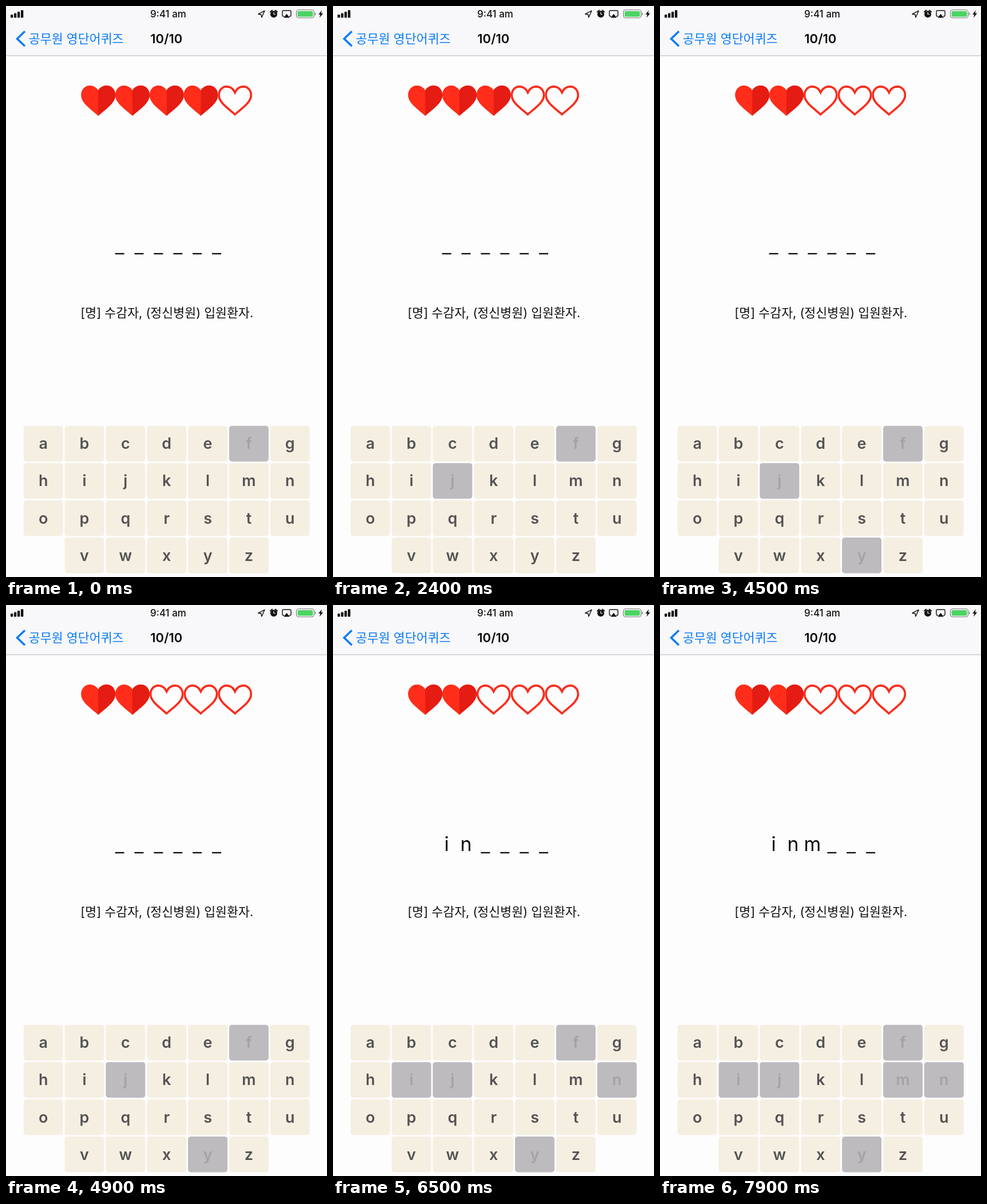
These frames come from a looping animation (561x998 px, 8 s). An HTML page:

```html
<!DOCTYPE html>
<html lang="ko">
<head>
<meta charset="utf-8">
<style>
  html, body { margin: 0; width: 100%; height: 100%; overflow: hidden; background: #fefdfe; }
  svg { display: block; width: 100%; height: 100%; }
  text { font-family: Inter, "Noto Sans CJK KR", "Noto Sans CJK", sans-serif; text-anchor: middle; }
  .outline { fill: none; stroke: #fb2c1c; stroke-width: 7.4; clip-path: url(#heartClip); }
  .key rect { fill: #f5efe2; }
  .key text { fill: #545353; font-size: 27px; font-weight: 600; }
  .used rect { fill: #bebbbf; }
  .used text { fill: #a4a2a6; }
</style>
</head>
<body>
<svg viewBox="0 0 561 998">
  <defs>
    <path id="heart" d="M0 8.5C-3 3-9 0-14.5 0C-23-.2-30 7-30 16.5C-30 31-13 41 0 53C13 41 30 31 30 16.5C30 7 23-.2 14.5 0C9 0 3 3 0 8.5Z"/>
    <clipPath id="heartClip"><use href="#heart"/></clipPath>
    <clipPath id="rightHalf"><rect width="31" height="54"/></clipPath>
  </defs>

  <rect width="561" height="87" fill="#f8f7f9"/>
  <rect y="86.3" width="561" height="1.2" fill="#c3c2c5"/>

  <g id="signal"></g>
  <text x="283.5" y="20" font-size="17" font-weight="500" fill="#111">9:41 am</text>
  <path d="M440.8 14.2L452 8.4L446.8 20L445.9 14.8Z" fill="none" stroke="#111" stroke-width="1.4" stroke-linejoin="round"/>
  <circle cx="468" cy="14.3" r="6" fill="#111"/>
  <path d="M462 10.3L465.2 7.6M474 10.3L470.8 7.6" stroke="#111" stroke-width="2" stroke-linecap="round"/>
  <path d="M468 10.8V14.5H471" fill="none" stroke="#f8f7f9" stroke-width="1.2"/>
  <path d="M486 18H484.5Q483 18 483 16.5V9.5Q483 8 484.5 8H496.5Q498 8 498 9.5V16.5Q498 18 496.5 18H495" fill="none" stroke="#111" stroke-width="1.4"/>
  <path d="M490.5 13.8L496 20.4H485Z" fill="#111"/>
  <rect x="507.5" y="6.8" width="31" height="14" rx="4" fill="none" stroke="#777" stroke-width="1.1"/>
  <rect x="509.6" y="8.9" width="26.8" height="9.8" rx="2.2" fill="#4cd463"/>
  <path d="M540 11.2Q543.2 13.8 540 16.4Z" fill="#777"/>
  <path d="M552 7.4L546 14.8H549.3L548 20.6L554.2 12.8H550.7Z" fill="#111"/>

  <path d="M33 44.3L19.5 57.3L33 70.3" fill="none" stroke="#0a7cf6" stroke-width="3.6"/>
  <text x="122.7" y="65" font-size="21.7" fill="#0a7cf6">공무원 영단어퀴즈</text>
  <text x="280.3" y="65.2" font-size="22" font-weight="600" fill="#0a0a0a">10/10</text>

  <g id="hearts"></g>
  <g id="word" font-size="34" fill="#0a0a0a"></g>
  <text x="281.3" y="544.3" font-size="21.7" fill="#111">[명] 수감자, (정신병원) 입원환자.</text>
  <g id="keys"></g>
</svg>

<script>
const LOOP = 8000;
const WORD = "inmate";
const LIVES = 5;
const presses = [["f", 0], ["j", 2000], ["y", 3600], ["i", 5100], ["n", 6000], ["m", 7200]];

const range = n => [...Array(n).keys()];
const build = (id, items, draw) => {
  const group = document.getElementById(id);
  group.innerHTML = items.map(draw).join("");
  return [...group.children];
};
const show = (node, visible) => { node.style.display = visible ? "" : "none"; };

build("signal", [5.5, 8, 10.5, 13.2], (h, i) =>
  `<rect x="${8 + i * 6}" y="${20.4 - h}" width="4.3" height="${h}" rx="1" fill="#111"/>`);

const hearts = build("hearts", range(LIVES), i =>
  `<g transform="translate(${161.2 + i * 59.75} 139)">
    <g><use href="#heart" fill="#ff2d1a"/><use href="#heart" fill="#e41c13" clip-path="url(#rightHalf)"/></g>
    <use href="#heart" class="outline"/>
  </g>`);

const slots = build("word", [...WORD], (letter, i) => {
  const x = 198.6 + i * 33.9;
  return `<g><rect x="${x - 8}" y="431.8" width="16" height="2.3"/><text x="${x}" y="430">${letter}</text></g>`;
});

const alphabet = [..."abcdefghijklmnopqrstuvwxyz"];
const keys = build("keys", alphabet, (letter, i) => {
  const row = Math.floor(i / 7);
  const column = i % 7 + (row === 3 ? 1 : 0);
  return `<g transform="translate(${30.7 + column * 71.85} ${733.8 + row * 65.1})">
    <rect width="69" height="62.4" rx="5"/><text x="34.5" y="40.6">${letter}</text>
  </g>`;
});

function render(time) {
  const used = presses.filter(([, at]) => at <= time).map(([letter]) => letter);
  const lives = LIVES - used.filter(letter => !WORD.includes(letter)).length;

  hearts.forEach((heart, i) => {
    show(heart.children[0], i < lives);
    show(heart.children[1], i >= lives);
  });
  slots.forEach((slot, i) => {
    const known = used.includes(WORD[i]);
    show(slot.children[0], !known);
    show(slot.children[1], known);
  });
  keys.forEach((key, i) =>
    key.setAttribute("class", used.includes(alphabet[i]) ? "key used" : "key"));
}

const start = performance.now();
function tick() {
  render((performance.now() - start) % LOOP);
  requestAnimationFrame(tick);
}
tick();
</script>
</body>
</html>
```
